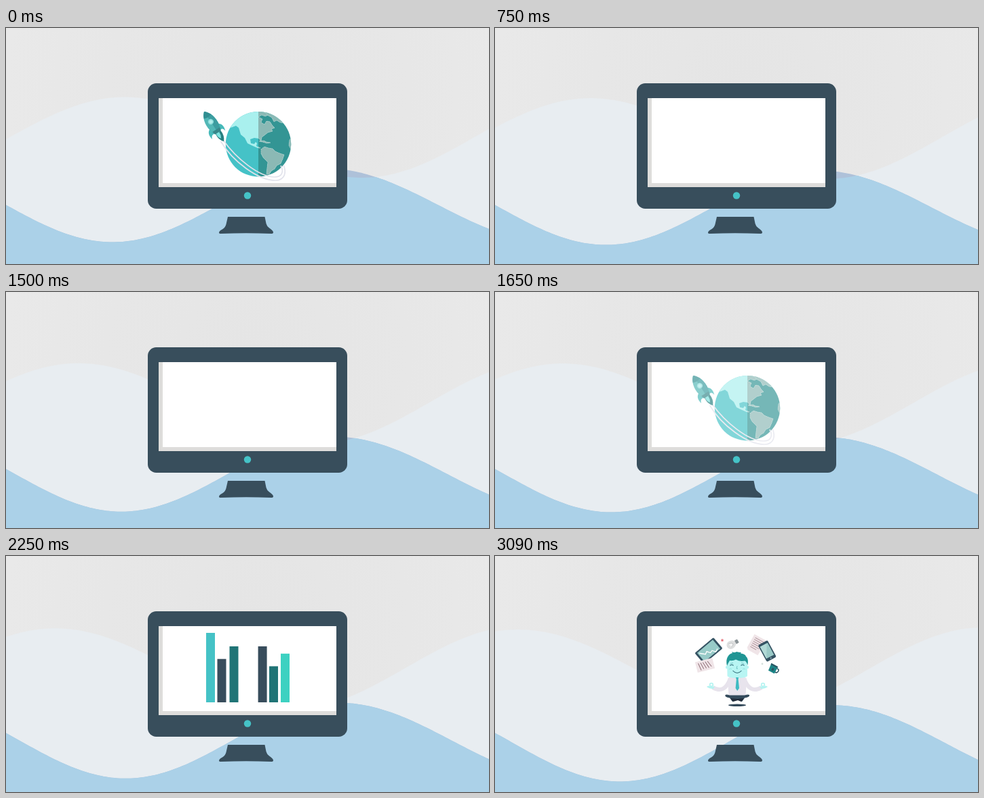
An HTML page for the animation above (3.15 s loop, 712 px wide and 350 px high).

```html
<!DOCTYPE html>
<html lang="en">
<head>
<meta charset="utf-8">
<title>Monitor slideshow</title>
<style>
  html, body { margin: 0; width: 100%; height: 100%; overflow: hidden; background: #e8e8e8; }
  svg { display: block; width: 712px; height: 350px; }
</style>
</head>
<body>
<svg viewBox="0 0 712 350" xmlns="http://www.w3.org/2000/svg">
  <defs>
    <radialGradient id="sky" gradientUnits="userSpaceOnUse" cx="370" cy="90" r="370">
      <stop offset="0" stop-color="#e5e5e5"/>
      <stop offset=".6" stop-color="#e7e7e7"/>
      <stop offset="1" stop-color="#e9e9e9"/>
    </radialGradient>
    <clipPath id="paleClip"><path class="pale"/></clipPath>
    <clipPath id="globeClip"><circle cx="372" cy="172.3" r="48.2"/></clipPath>
    <clipPath id="eastClip"><rect x="372" y="120" width="52" height="104"/></clipPath>
    <g id="land">
      <path d="M331 148 L338 130 L360 118 L385 120 L400 126 L397 130 L389 128 L382 131 L377 129 L372 132 L378 135
        L376 140 L381 143 L384 138 L389 139 L393 145 L396 148 L391 150 L393 153 L386 155 L381 159 L377 162
        L376 168 L373 164 L366 163 L360 165 L361 171 L366 172 L368 169 L370 171 L369 175 L375 178 L371 178
        L362 174 L356 171 L352 163 L346 158 L343 148 L339 145 Z"/>
      <path d="M380 121 L400 126 L409 141 L404 140 L399 137 L395 139 L392 133 L385 129 Z"/>
      <path d="M376 180 L381 176 L387 178 L393 179 L397 183 L404 186 L410 188 L408 194 L405 201 L399 204
        L396 209 L391 212 L388 217 L384 217 L385 207 L386 199 L379 192 L376 186 Z"/>
      <path d="M373 168 L380 167 L384 169 L390 170 L385 171 L378 169 Z"/>
      <path d="M422 160 L418 166 L417 174 L420 180 Z"/>
    </g>
  </defs>

  <rect width="712" height="350" fill="url(#sky)"/>
  <path class="pale" fill="#e8edf1"/>
  <path class="blue" fill="#aec1d9"/>
  <g clip-path="url(#paleClip)"><path class="blue" fill="#abd1e8"/></g>

  <rect x="209" y="82" width="294" height="186" rx="12.5" fill="#384e5c"/>
  <rect x="225" y="104" width="262" height="132" fill="#dedddb"/>
  <rect x="231" y="104" width="256" height="126" fill="#fff"/>
  <circle cx="356" cy="248.5" r="5.2" fill="#45c3c7"/>
  <path fill="#384e5c" d="M327 280 H381.5 L383.5 290 Q384.500 294 388 296.500 Q394 300.500 394 303
    Q394 305 391 305 Q354 303.500 317 305 Q314 305 314 303.500 Q314 301 319 298.500 Q323.500 295.500 324.500 291 Z"/>

  <g id="space">
    <g clip-path="url(#globeClip)">
      <rect x="323" y="123" width="49" height="99" fill="#45c2c7"/>
      <rect x="372" y="123" width="49" height="99" fill="#339594"/>
      <use href="#land" fill="#a9f0ee"/>
      <use href="#land" fill="#8bb9b5" stroke="#c3d6d3" stroke-width=".7" stroke-dasharray="1.500 1" clip-path="url(#eastClip)"/>
    </g>
    <g fill="none" stroke="#e1e2eb" stroke-width="1.700">
      <path d="M316.500 168 C334 198 372 226 397 226 C411 226 414 214 409 203"/>
      <path d="M320 166 C339 193 373 221 396 221 C407 221 410 213 405 204"/>
    </g>
    <g transform="translate(292 124) rotate(-33.400)">
      <path fill="#46b9b9" d="M-7 26 C-13 29 -14 34 -12.500 41 C-11 36 -8 35 -5 36 Z M7 26 C12 29 13 34 10.500 41 C10 36 8 35 5 36 Z"/>
      <path fill="#287f80" d="M-4 37 H5 Q6 46 0 53 Q-6 46 -4 37"/>
      <path fill="#7ce3df" d="M-3 37 H2 Q2 43 -1 47 Q-5 43 -3 37"/>
      <path fill="#52b7b6" d="M0 0 C7 6 10 16 8 28 L5 37 H-5 L-8 28 C-10 16 -7 6 0 0"/>
      <path fill="#3c9da0" d="M0 0 C7 6 10 16 8 28 L5 37 H0 Z"/>
      <path fill="#318e91" d="M0 0 C3 3 5 5 6 9 Q0 11 -6 9 C-5 5 -3 3 0 0"/>
      <circle cy="18" r="4.200" fill="#8cdcda"/>
      <circle cy="18" r="2.500" fill="#b2edeb"/>
      <path fill="#37878a" d="M-6.500 32 H6.500 L5 37 H-5 Z"/>
    </g>
  </g>

  <g id="bars"></g>

  <g id="juggler">
    <g transform="translate(315 140.500) rotate(-40)">
      <rect x="-18" y="-10.500" width="36" height="21" rx="1.500" fill="#355363"/>
      <rect x="-15" y="-8.500" width="30" height="17" fill="#98cbc8"/>
      <path d="M-13 -6 L-7 1 L-3 -1 L0 4 L4 3 L7 8 L12 6" fill="none" stroke="#fff" stroke-width="1.300"/>
    </g>
    <g id="sheet" transform="translate(309.500 162) rotate(-14)">
      <rect x="-13" y="-8" width="26" height="16" fill="#f0e5e8"/>
      <path d="M-9 -5 L-7 6 M-5.500 -5 L-3 5 M-2 -5 L1 5 M1.500 -5 L5 5 M5 -5 L9 4" stroke="#92727a"/>
    </g>
    <path d="M335 122.800 V127 M333.200 124 L336.800 126 M336.800 124 L333.200 126" stroke="#df5b66" stroke-width=".9"/>
    <g transform="translate(347.500 132) rotate(-30)">
      <path fill="#dedfdf" d="M0 -6 Q5 -6 7 -3 H10 V3 H7 Q5 6 0 6 A6 6 0 0 1 0 -6"/>
      <path d="M-2 -3 Q3 -3 4 0 Q3 3 -1 3" fill="#f4f4f4" stroke="#b9bcbd" stroke-width=".8"/>
      <rect x="8" y="-3" width="4.500" height="6" rx="1" fill="#8a9396"/>
    </g>
    <g transform="translate(385 131) rotate(29)">
      <path fill="#f0e5e8" d="M-9.500 -12 H10 V13 H-7 L-9.500 10 Z"/>
      <path d="M-6 -8 H8 M-6 -5 H8 M-6 -2 H8 M-6 1 H7 M-6 4 H7 M-6 7 H4" stroke="#a98c93" stroke-width=".9"/>
    </g>
    <g transform="translate(401.200 141) rotate(-28)">
      <rect x="-8" y="-14" width="16" height="28" rx="2" fill="#355363"/>
      <rect x="-6.300" y="-10.500" width="12.600" height="20" fill="#9acac7"/>
      <path d="M-6.300 9.500 V-10.500 H5 Z" fill="#b2d9d6"/>
      <circle cy="11.800" r="1" fill="#a7bcc3"/>
    </g>
    <g transform="translate(409.500 167) rotate(28)">
      <path d="M5 -3 H7 Q9 -3 9 0 Q9 3 6 3 H4" fill="none" stroke="#28515f" stroke-width="1.500"/>
      <path fill="#1c8587" d="M-5.500 -6 H5.500 V5.500 H-4.500 Z"/>
      <path fill="#2d5462" d="M-5.500 -6 H5.500 V-4 H-5.500 Z M-1 -1 H2 V3 H-1 Z"/>
    </g>
    <circle cx="394" cy="160" r="1.400" fill="#d5e0dc"/>

    <ellipse cx="357" cy="221.200" rx="13" ry="1.700" fill="#33495a"/>
    <path d="M346 184 C341 196 334 202 321 195 M368 184 C373 196 380 202 393 195" fill="none" stroke="#e7e3ec" stroke-width="6"/>
    <g id="hand">
      <path d="M312 194 Q315 191 318 194 L324 193.500 L322 197 Q316 197 312 194" fill="#b5f3f1"/>
      <circle cx="319" cy="191" r="2.300" fill="none" stroke="#b5f3f1" stroke-width="1.700"/>
    </g>
    <use href="#hand" transform="translate(714 0) scale(-1 1)"/>
    <path d="M343 182 Q345 179 351 178.500 H363 Q369 179 371 182 L369.500 207 H344.500 Z" fill="#e8e4ed"/>
    <path d="M339.500 206 Q341 205 346 206.500 H368 Q373 205 375 206 Q376 209 368 210.500 L364 216 L359 213 H355 L350 216 L346 210.500 Q338 209 339.500 206" fill="#344b5c"/>
    <path d="M347 211 L357 212 L367 211 L363 216 L358 214 L351 216 Z" fill="#222c3a"/>
    <path d="M342 151 Q342 146 357 146 Q372 146 372 153 V178 Q370 181 357 181 Q344 181 342.500 178 Z" fill="#b8f5f3"/>
    <circle cx="342" cy="165" r="2.200" fill="#b8f5f3"/>
    <circle cx="372" cy="165" r="2.200" fill="#b8f5f3"/>
    <path d="M342 163 Q340 154 343 150 Q345 145 350 144 L349 142 Q353 144 356 142 Q360 143 363 143 L362 144.500 Q369 145 370 149 Q374 152 372.500 162
      Q371 157 368.500 155.500 Q360 157 355 153.500 Q351 156 346 155 Q344 158 342 163" fill="#209594"/>
    <path d="M346.500 162.500 Q349 160 351.500 162.500 M362.500 162.500 Q365 160 367.500 162.500 M350.500 170 Q357 177 363.500 170" fill="none" stroke="#2f6b78" stroke-width="1.100"/>
    <path d="M347 159.500 L351 158.500 M363 158.500 L367 159.500 M357 163 L356 167 H358" fill="none" stroke="#64b8ba" stroke-width=".8"/>
    <path d="M345 168 Q347 166 349 168 M365 168 Q367 166 369 168" fill="none" stroke="#93e4e1"/>
    <path d="M355 180 H359 L358.600 183 L360 196 L357.200 200 L354.600 196 L355.800 183 Z" fill="#3fbbc2"/>
  </g>
</svg>
<script>
const LOOP = 3150;
const all = selector => [...document.querySelectorAll(selector)];
const byId = id => document.getElementById(id);
const clamp = v => Math.max(0, Math.min(1, v));
const mix = (a, b, k) => a + (b - a) * k;

// Each bar: left edge, top, colour.
byId('bars').innerHTML = [
  [295, 114, '#45c2c6'], [311.5, 152.7, '#384d5c'], [329.5, 134, '#207476'],
  [371.6, 134, '#384d5c'], [388, 163.5, '#207476'], [405, 144.8, '#3dd1c1']
].map(([x, y, fill]) =>
  `<rect x="${x}" y="${y}" width="13" height="${217 - y}" fill="${fill}"/>`).join('');

// Each showing: slide, fade-in start and end, fade-out start and end (ms).
const showings = [
  ['space', -2, -1, 30, 180],
  ['bars', 360, 510, 600, 750],
  ['juggler', 900, 1080, 1170, 1350],
  ['space', 1530, 1710, 1710, 1890],
  ['bars', 2070, 2250, 2280, 2430],
  ['juggler', 2580, 2760, 4000, 4001]
];

// Joins crests and troughs with half cosine waves and closes the area below.
function wavePath(knots) {
  let d = 'M0 350';
  let i = 0;
  for (let x = 0; x <= 712; x += 4) {
    while (i < knots.length - 2 && x > knots[i + 1][0]) i++;
    const [x0, y0] = knots[i], [x1, y1] = knots[i + 1];
    const k = (1 - Math.cos(Math.PI * (x - x0) / (x1 - x0))) / 2;
    d += `L${x} ${mix(y0, y1, k).toFixed(2)}`;
  }
  return d + 'L712 350Z';
}

function paleWave(k) {
  const x = mix(175, 31, k), top = mix(102.5, 109.2, k), low = mix(222, 229, k);
  return wavePath([[x - 340, low], [x, top], [x + 350, low], [x + 685, top - 3], [x + 1030, low]]);
}

function blueWave(k) {
  const x = mix(157, 184.5, k), top = mix(208, 221.5, k), low = mix(317.5, 334.8, k);
  return wavePath([[x - 313, top], [x, low], [x + 313, top], [x + 648, low]]);
}

function draw(now) {
  const t = now % LOOP;
  const pale = paleWave(t / LOOP), blue = blueWave(t / LOOP);
  all('.pale').forEach(p => p.setAttribute('d', pale));
  all('.blue').forEach(p => p.setAttribute('d', blue));

  const opacity = { space: 0, bars: 0, juggler: 0 };
  for (const [slide, in0, in1, out0, out1] of showings) {
    const shown = clamp((t - in0) / (in1 - in0)) * clamp((out1 - t) / (out1 - out0));
    opacity[slide] = Math.max(opacity[slide], shown);
  }
  for (const slide in opacity) byId(slide).setAttribute('opacity', opacity[slide]);
}

const start = performance.now();
function tick() {
  draw(performance.now() - start);
  requestAnimationFrame(tick);
}
tick();
</script>
</body>
</html>
```
